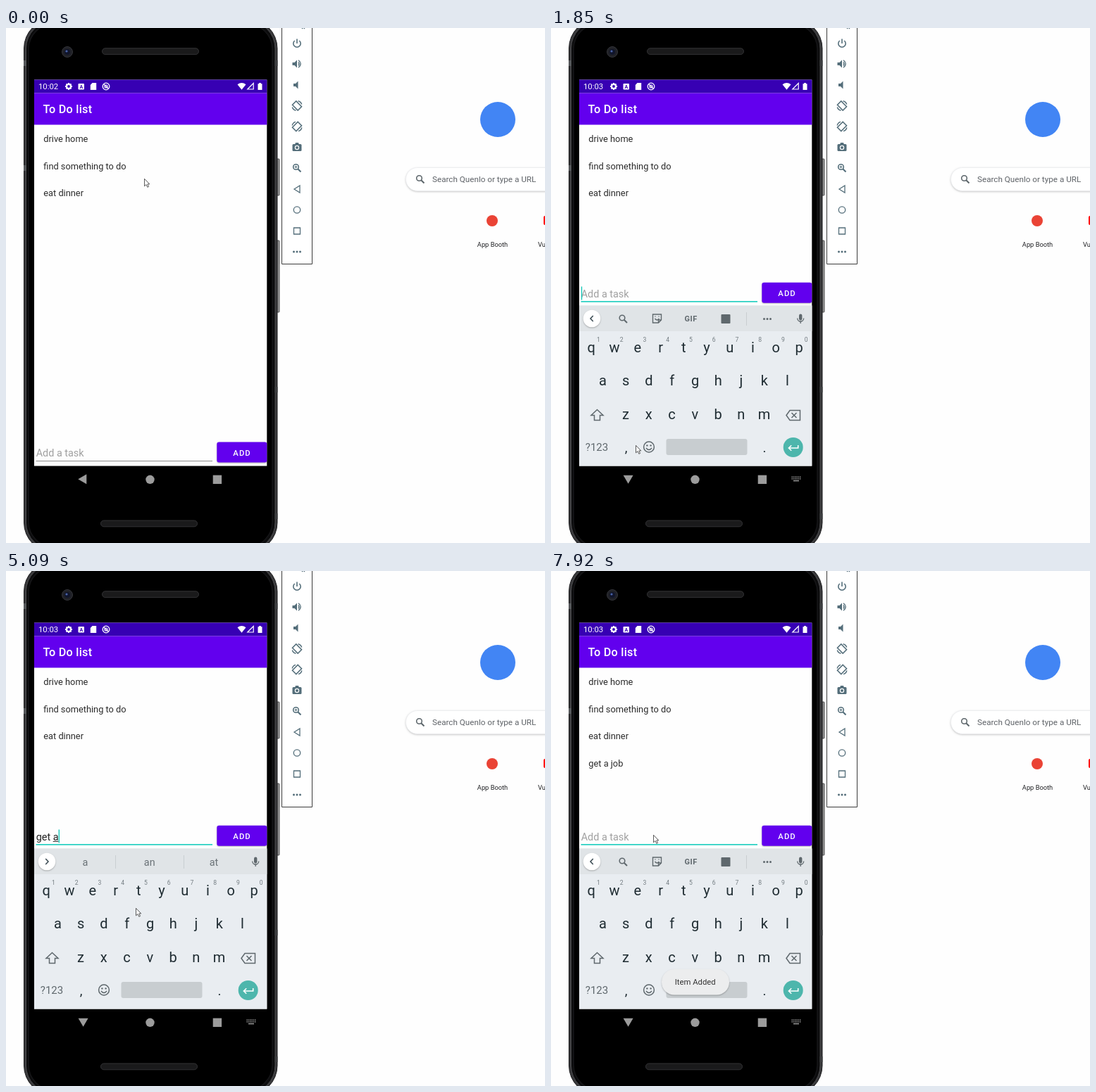
Write an HTML page with a canvas that moves like this. It is 765 px wide and 732 px high and loops after 8 s.

```html
<!DOCTYPE html>
<html lang="en">
<head>
<meta charset="utf-8">
<title>To Do list</title>
<style>
html, body { margin: 0; width: 100%; height: 100%; overflow: hidden; background: #fefefe }
canvas { display: block }
</style>
</head>
<body>
<canvas id="stage" width="765" height="732"></canvas>
<script>
const c = document.getElementById('stage').getContext('2d');
const LOOP = 8000, SLATE = '#546e7a', GRAY = '#5f686d', NAV = '#9c9c9c', PURPLE = '#6200ee';

// Each state holds until the next one: [time, x, y].
const pointer = [
  [0, 197, 214], [150, 197, 197], [430, 163, 197], [860, 152, 290], [1000, 130, 500], [1140, 122, 598],
  [1850, 121, 593], [2000, 130, 575], [2130, 152, 538], [2270, 175, 497], [2410, 185, 479],
  [6530, 198, 465], [6660, 240, 430], [6790, 290, 395], [6940, 328, 376], [7080, 341, 369],
  [7650, 300, 371], [7780, 218, 374], [7920, 146, 375]
];
// [time, text, suggestions]
const typing = [
  [0, ''],
  [4580, 'g', 'g get good'], [4710, 'ge', 'ge get general'], [4840, 'get', 'get gets Get'],
  [4970, 'get ', 'the a it'], [5090, 'get a', 'a an at'], [5360, 'get a ', 'good new job'],
  [5480, 'get a j', 'j just job'], [5850, 'get a jo', 'jo job join'], [5970, 'get a job', 'job jobs Job'],
  [7350, '']
];
const caretToggles = [1430, 2000, 2540, 3070, 3620, 4050, 4580, 6530, 6940, 7650];
const at = (list, t) => list.filter(s => s[0] <= t).pop();

function box(x, y, w, h, fill, r = 0, stroke, lw = 1) {
  c.beginPath();
  c.roundRect(x, y, w, h, r);
  if (fill) { c.fillStyle = fill; c.fill(); }
  if (stroke) { c.strokeStyle = stroke; c.lineWidth = lw; c.stroke(); }
}
function disc(x, y, r, fill, stroke, lw = 1) { box(x - r, y - r, 2 * r, 2 * r, fill, r, stroke, lw); }

function text(s, x, y, size, color, align = 'left', weight = 400, spacing = 0) {
  c.font = `${weight} ${size}px Roboto, sans-serif`;
  c.letterSpacing = spacing + 'px';
  c.textAlign = align;
  c.fillStyle = color;
  c.fillText(s, x, y);
}
// Draws an SVG path around (x, y); a line width makes it an outline.
function icon(d, x, y, color, lw = 0, turn = 0) {
  c.save();
  c.translate(x, y);
  c.rotate(turn);
  c.fillStyle = c.strokeStyle = color;
  c.lineWidth = lw;
  const p = new Path2D(d);
  if (lw) c.stroke(p); else c.fill(p);
  c.restore();
}
function shadowed(blur, dy, draw) {
  c.save();
  c.shadowColor = '#0004';
  c.shadowBlur = blur;
  c.shadowOffsetY = dy;
  draw();
  c.restore();
}
function search(x, y, color, plus) {
  disc(x - 1.5, y - 1.5, 3.8, null, color, 1.6);
  icon('M1.2 1.2L5.5 5.5', x, y, color, 2);
  if (plus) icon('M-3.5-1.5h4M-1.5-3.5v4', x, y, color, 1);
}
function dots(x, y, color) {
  for (const dx of [-4.5, 0, 4.5]) disc(x + dx, y, 1.5, color);
}

function browser() {
  disc(698, 130, 25, '#4285f4');
  shadowed(3, 1, () => box(567.5, 198.5, 260, 33, '#fff', 16.5));
  box(567.5, 198.5, 260, 33, '#fff', 16.5, '#e8eaed', .7);
  search(588, 215, GRAY);
  text('Search Quenlo or type a URL', 605, 219, 11.7, '#5f6368');
  disc(690, 274, 8, '#ea4335');
  text('App Booth', 690.5, 311, 9.3, '#202124', 'center');
  box(763, 267, 14, 13, '#f00', 2);
  text('Vu', 755, 311, 9.3, '#202124');
}

function emulatorBar() {
  box(391.5, -2, 43, 337.5, '#fff', 0, '#3c3c3c');
  icon('M-2-2L2 2M2-2L-2 2', 422, -1, SLATE, 1.2);
  const x = 413, speaker = 'M-5-2h3l3.5-3.5v11L-2 2h-3z';
  icon('M-3.3-4A5.2 5.2 0 1 0 3.3-4M0-6.5V0', x, 22, SLATE, 1.6);
  icon(speaker, x - 1.5, 51, SLATE);
  icon('M2-2.5q2 2.5 0 5M2-5.2q6.5 5.2 0 10.4', x, 51, SLATE, 1.4);
  icon(speaker, x, 81, SLATE);
  for (const [y, side] of [[110.5, -1], [140, 1]]) {
    icon('M-3.8-5.5h7.6v11h-7.6z', x, y, SLATE, 1.5, side * Math.PI / 4);
    icon('M-6.8-1.5A7 7 0 0 1-2-6.7M6.8 1.5A7 7 0 0 1 2 6.7', x, y, SLATE, 1.4, side < 0 ? Math.PI / 2 : 0);
  }
  box(x - 6.5, 165, 13, 10, SLATE, 1.5);
  box(x - 2.5, 163, 5, 3, SLATE, 1);
  disc(x, 170, 2.6, SLATE, '#fff', 1.2);
  search(x, 199, SLATE, true);
  icon('M-4 0L4-5v10z', x, 229, SLATE, 1.3);
  disc(x, 258.5, 4.7, null, SLATE, 1.3);
  box(x - 4.5, 284, 9, 9, null, 0, SLATE, 1.3);
  dots(x, 318, SLATE);
}

function phoneBody() {
  const metal = c.createLinearGradient(383, 0, 389, 0);
  metal.addColorStop(.2, '#444');
  metal.addColorStop(.65, '#b0b0b0');
  metal.addColorStop(1, '#555');
  box(383, 186, 5, 52, metal, 1, '#333', .8);
  box(383, 302, 5, 102, metal, 1, '#333', .8);
  box(25.5, -13, 359.5, 758, '#39393b', 42, '#1c1c1e');
  box(28.5, -10, 353.5, 752, '#0c0c0d', 39, '#4a4a4d', 1);
  box(32, -6, 346, 744, '#000', 36, '#161618', 1.5);
  for (const y of [46, 195]) box(25, y, 4, 8, '#55575a');
  for (const y of [46, 510, 690]) box(381.5, y, 4, 8, '#3d3e40');
  box(136.5, 28.8, 137, 8.8, '#1a1a1b', 4.4, '#333335');
  box(134.5, 700, 137, 8.8, '#1a1a1b', 4.4, '#333335');
  disc(87, 34, 7.5, '#202127', '#34353a');
  disc(87, 34, 4, '#10152b');
  disc(86, 33, 1.6, '#4a63a8');
}

function appHeader(t) {
  box(40, 73.4, 330.3, 549, '#fefefe');
  box(40, 73.4, 330.3, 19.2, '#3700b3');
  box(40, 92.4, 330.3, 45, PURPLE);
  text(t < 1290 ? '10:02' : '10:03', 46, 87.3, 11.3, '#fff');
  disc(89, 83, 3, null, '#fff', 2.2);
  for (let i = 0; i < 8; i++) icon('M-1-5h2v2h-2z', 89, 83, '#fff', 0, i * Math.PI / 4);
  box(102.5, 79, 8.5, 8.5, '#fff', 1);
  text('A', 106.8, 86, 7, '#3700b3', 'center', 700);
  icon('M-1.5-5H4.2v10h-8.4v-7z', 124, 83, '#fff');
  disc(142, 83, 4.8, null, '#fff', 1.3);
  disc(142, 83, 2, null, '#fff', 1.2);
  icon('M-3-3L3 3', 142, 83, '#fff', 1.2);
  icon('M-6-2.8Q0-7 6-2.8L0 4.7z', 334.5, 83, '#fff');
  icon('M-4.2 4L4.2-4.5V4z', 347, 83, '#fff', 1.2);
  icon('M-3-3.7h1.7V-5h2.6v1.3H3V5h-6z', 360.5, 83, '#fff');
  text('To Do list', 52.5, 121.3, 16.2, '#fff', 'left', 500, .25);
  const items = ['drive home', 'find something to do', 'eat dinner'];
  if (t >= 7350) items.push('get a job');
  items.forEach((s, i) => text(s, 53.3, 162.3 + i * 38.5, 12.8, '#2b2b2b'));
}

function inputRow(t, typed) {
  const dy = t < 1570 ? 226.7 : 0, focused = t >= 1430;
  text(typed || 'Add a task', 42.7, 382.6 + dy, 14.4, typed ? '#222' : '#a0a0a0');
  const end = typed ? 43.5 + c.measureText(typed).width : 43.5;
  const word = typed.split(' ').pop();
  if (word) {
    const w = c.measureText(word).width;
    box(end - w - .8, 384, w, 1, '#333');
  }
  box(42.5, (focused ? 388 : 388.4) + dy, 250.5, focused ? 1.7 : 1, focused ? '#2bd1c3' : '#8c8c8c');
  if (caretToggles.filter(s => s <= t).length % 2) box(end - .7, 367.5 + dy, 1.4, 19, '#18c9ba');

  shadowed(2, 1, () => box(299.3, 361.8 + dy, 71, 29, PURPLE, 3));
  if (t >= 7220 && t < 7780) {
    c.save();
    c.beginPath();
    c.roundRect(299.3, 361.8, 71, 29, 3);
    c.clip();
    c.globalAlpha = .14 * Math.min(1, (7780 - t) / 300);
    disc(339, 369, 22 + Math.max(0, t - 7350) * .12, '#fff');
    c.restore();
  }
  text('ADD', 335, 380.8 + dy, 11.3, '#fff', 'center', 500, 1);
}

function keyboard(suggestions) {
  box(40, 394.5, 330.3, 228, '#e9edf1');
  box(40, 394.5, 330.3, 36.5, '#e0e4e7');
  shadowed(2, 1, () => disc(58, 413, 12.3, '#fff'));
  icon('M1.8-4L-2 0L1.8 4', 58, 413, '#37474f', 1.5, suggestions ? Math.PI : 0);
  if (suggestions) {
    suggestions.split(' ').forEach((s, i) => text(s, 112.5 + i * 91.2, 418.8, 14.4, '#6a7277', 'center'));
    for (const x of [155, 252]) box(x, 404, 1, 19, '#c9ced1');
  } else {
    search(102.5, 413.5, GRAY);
    icon('M-6-6H6V2L2 6h-8zM6 2H2v4M-3 0q3 4 6 0M-3-3h1M2-3h1', 150.5, 413, GRAY, 1.4);
    text('GIF', 198.7, 417, 11, GRAY, 'center', 700, .5);
    box(241.5, 407, 13, 13, GRAY, 1);
    box(277, 404, 1, 19, '#c9ced1');
    dots(307, 413.5, GRAY);
  }
  box(352, 406.5, 4.4, 9, GRAY, 2.2);
  icon('M-4.5 0a4.5 4.5 0 0 0 9 0M0 4.5v3', 354.2, 412.5, GRAY, 1.3);

  [['qwertyuiop', 57.3, 461.3], ['asdfghjkl', 73.5, 508.3], ['zxcvbnm', 106, 556.3]].forEach(([row, x0, y], r) => {
    [...row].forEach((key, i) => {
      const x = x0 + i * 32.75;
      text(key, x, y, 20, '#1f2c32', 'center');
      if (!r) text((i + 1) % 10, x + 10.2, 446, 8.6, '#737c81', 'center');
    });
  });
  icon('M0-8L8.5 0H4v7h-8V0h-4.5z', 65.5, 550.5, GRAY, 1.5);
  icon('M-10 0L-5-7H9.5V7H-5zM-2.5-3.5l7 7m0-7l-7 7', 344, 550.5, GRAY, 1.5);
  text('?123', 65, 601, 15, GRAY, 'center');
  text(',', 106.5, 603, 19, '#1f2c32', 'center');
  text('.', 303, 603, 19, '#1f2c32', 'center');
  disc(139, 595.5, 7.4, null, GRAY, 1.5);
  disc(136.4, 593.4, 1.2, GRAY);
  disc(141.6, 593.4, 1.2, GRAY);
  icon('M-4 1.5q4 5 8 0', 139, 595.5, GRAY, 1.5);
  box(163.5, 584, 115, 23, '#c8cdd0', 3);
  disc(343.7, 596, 14, '#4db6ac');
  icon('M7-4v4H-6M-2.5-3.7L-6.3 0l3.8 3.7', 343.7, 597, '#fff', 1.6);
}

function navigation(t) {
  const turn = t < 1570 ? 0 : t < 1850 ? 1 : 3;
  icon('M-6.5 0L5.5-7V7z', turn ? 109.6 : 108.8, turn === 1 ? 639.7 : 641.3, NAV, 0, turn * Math.PI / 2);
  disc(204.5, 641.8, 6.2, NAV);
  box(293.7, 635.6, 12.4, 12.4, NAV);
  if (t < 1570) return;
  for (let i = 0; i < 12; i++) box(341.5 + i % 6 * 2.3, 637.5 + (i / 6 | 0) * 2.5, 1.4, 1.5, NAV);
  box(344, 642.8, 8, 1.5, NAV);
}

function toast(t) {
  c.save();
  c.globalAlpha = Math.max(0, Math.min(1, (t - 7450) / 350));
  shadowed(2, 1, () => box(157, 566, 96, 36.5, '#ecedee', 18));
  text('Item Added', 204.7, 588, 11.3, '#333', 'center');
  c.restore();
}

function draw(now) {
  const t = now % LOOP;
  const [, typed, suggestions] = at(typing, t);
  box(0, 0, 765, 732, '#fefefe');
  browser();
  emulatorBar();
  phoneBody();
  appHeader(t);
  inputRow(t, typed);
  if (t >= 1850) keyboard(suggestions);
  navigation(t);
  if (t > 7450) toast(t);
  const [, x, y] = at(pointer, t);
  const arrow = 'M0 0V10.5L2.5 8.3L4.3 12L6 11.2L4.3 7.6H7.3z';
  icon(arrow, x - .5, y + .3, '#fff');
  icon(arrow, x - .5, y + .3, '#333', .8);
  requestAnimationFrame(draw);
}
requestAnimationFrame(draw);
</script>
</body>
</html>
```
